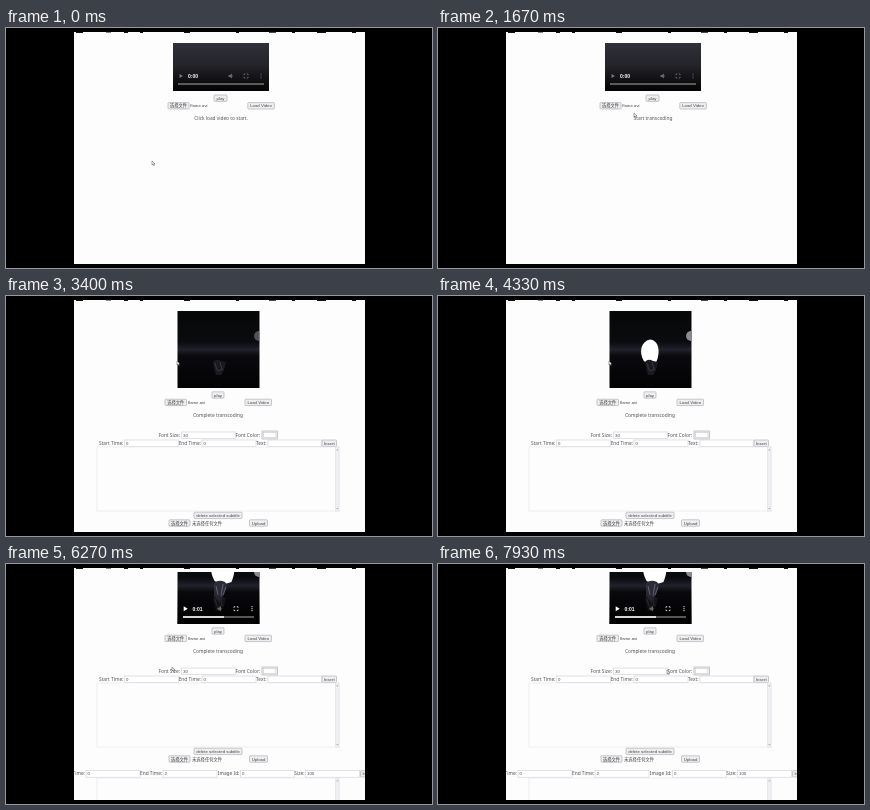
These frames come from a looping animation (426x240 px, 8000 ms). An HTML page:

```html
<!DOCTYPE html>
<html lang="en">
<head>
<meta charset="utf-8">
<style>
html, body { margin: 0; width: 100%; height: 100%; overflow: hidden; background: #000; }
svg { display: block; width: 100%; height: 100%; }
text { font: 4.3px "Liberation Sans", "Noto Sans CJK SC", "Noto Sans CJK", sans-serif; fill: #444; }
.label { font: 4.8px "Noto Sans", sans-serif; fill: #555; }
.time { font-size: 5px; font-weight: bold; fill: #fff; }
</style>
</head>
<body>
<svg viewBox="0 0 426 240">
  <defs>
    <linearGradient id="empty" x2="0" y2="1">
      <stop stop-color="#30303a"/><stop offset=".45" stop-color="#24242a"/><stop offset="1" stop-color="#030303"/>
    </linearGradient>
    <linearGradient id="night" x2="0" y2="1">
      <stop stop-color="#060807"/><stop offset=".4" stop-color="#0a0b0e"/><stop offset=".5" stop-color="#20212b"/>
      <stop offset=".58" stop-color="#0a0a0e"/><stop offset="1" stop-color="#020203"/>
    </linearGradient>
    <linearGradient id="shade" x2="0" y2="1">
      <stop stop-opacity="0"/><stop offset="1" stop-opacity=".75"/>
    </linearGradient>
    <clipPath id="page"><rect x="68" y="4" width="291" height="232"/></clipPath>
    <clipPath id="view"><rect x="68" y="8" width="291" height="228"/></clipPath>
    <clipPath id="screen"><rect x="171.5" y="15" width="82" height="77"/></clipPath>
  </defs>
  <rect width="426" height="240"/>
  <rect x="68" y="4" width="291" height="232" fill="#fdfdfe"/>
  <path d="M70 4.3h7M100 4h5M118 4.3h4M134 4.3h3M178 4.3h6M230 4.3h3M263 4.2h7M286 4.3h3M311 4.3h9M346 4.3h4" stroke="#111" stroke-width="1.2"/>
  <g id="before" clip-path="url(#page)"></g>
  <g clip-path="url(#view)"><g id="after"></g></g>
  <g id="cursor">
    <path id="arrow" d="M0 0v4.6l1.1-1 .8 1.8 .9-.4-.8-1.7h1.5z" fill="#fff" stroke="#333" stroke-width=".5"/>
    <path id="pointer" d="M1 0h1v2l2.3.5v2l-.8 1.3h-2.2l-1.5-2.2 1.2-.2z" fill="#fff" stroke="#333" stroke-width=".3"/>
  </g>
</svg>
<script>
const $ = id => document.getElementById(id);
const LOOP = 8000, STEP = 200 / 3;

const text = (x, y, s, attrs = '') => `<text x="${x}" y="${y}" ${attrs}>${s}</text>`;
const label = (x, y, s) => text(x, y, s, 'class="label"');
const box = (x, y, w, h, fill, stroke, r = 0) =>
  `<rect x="${x}" y="${y}" width="${w}" height="${h}" rx="${r}" fill="${fill}" stroke="${stroke}" stroke-width=".6"/>`;
const button = (x, y, w, s) => box(x, y, w, 6.4, '#efeff1', '#a5a5ad', .8) +
  text(x + w / 2, y + 4.7, s, 'text-anchor="middle"');
const input = (x, y, s = '') => box(x, y, 54, 6.6, '#fff', '#ceced6') + text(x + 1.5, y + 4.8, s);
const area = (y, h) => box(91, y, 242, h, '#fdfdfe', '#e4e4ea') +
  box(329.5, y, 3.5, h, '#f0f0f2', '#dedee4') +
  `<path d="M330.3 ${y + 3.2}l1-1.3 1 1.3zM330.3 ${y + h - 3}l1 1.3 1-1.3z" fill="#999"/>`;
const message = (id, x, y) => text(x, y, '', `id="${id}" class="label" text-anchor="middle"`);

// Speaker, fullscreen corners and menu dots, centred on the given x positions.
const icons = (y, speaker, full, menu, color) => `
  <path d="M${speaker - 2.5} ${y - 1}h1.5l2-1.6v5.2l-2-1.6h-1.5zM${speaker + 1.4} ${y - 1}q1.6 1 0 2" fill="#666"/>
  <path d="M${full - 2} ${y - .8}v-1.2h1.2m1.6 0h1.2v1.2m0 1.6v1.2h-1.2m-1.6 0h-1.2v-1.2" fill="none" stroke="${color}" stroke-width=".8"/>
  ${[-2, 0, 2].map(d => `<circle cx="${menu}" cy="${y + d}" r=".6" fill="${color}"/>`).join('')}`;

$('before').innerHTML =
  box(167, 15, 96, 48, 'url(#empty)', 'none') +
  '<path d="M173.5 46l3.5 2-3.5 2z" fill="#777"/>' +
  text(182, 50, '0:00', 'class="time"') +
  icons(48, 225, 240, 255, '#777') +
  '<path d="M172 56h86" stroke="#aaa"/>' +
  button(208, 67, 13, 'play') +
  button(162, 74.6, 21, '选择文件') + text(184.3, 79.3, 'flame.avi') +
  button(241.8, 74.6, 26.5, 'Load Video') +
  message('status', 215, 92);

$('after').innerHTML =
  `<g clip-path="url(#screen)">
    <rect x="171" y="15" width="83" height="77" fill="url(#night)"/>
    <circle id="lamp" cx="253" cy="40" r="5" fill="#8a8a90"/>
    <path id="flame" fill="#fff"/>
    <path d="M207 66q3-4 8-1l5 1-2 8-3 5h-5l-2-7z" fill="#191920"/>
    <path d="M209 67l2 7m3-8l2 7m-5 2l6-2" stroke="#44444e" stroke-width=".7"/>
    <g id="hand">
      <path d="M208 51q5-4 11-1l2 3-3 10-4 8-6-7z" fill="#2b2c38"/>
      <path d="M210 54l2 9m5-11l-2 12m5-9l-3 8" stroke="#777a88" stroke-width=".7"/>
    </g>
    <g id="controls">
      <rect x="171" y="58" width="83" height="34" fill="url(#shade)"/>
      <path id="toggle" fill="#fff"/>
      ${text(186.5, 78.7, '', 'id="clock" class="time"')}
      ${icons(76.7, 214, 230, 246, '#eee')}
      <path d="M177 85h71" stroke="#aaa" stroke-width="1.2"/>
      <path id="progress" stroke="#fff" stroke-width="1.5"/>
      <circle id="knob" cy="85" r="1.8" fill="#fff"/>
    </g>
  </g>` +
  button(206, 95.8, 12, 'play') +
  button(159, 103.2, 21.5, '选择文件') + text(182, 108, 'flame.avi') +
  button(239, 103.2, 26.5, 'Load Video') +
  label(187, 121, 'Complete transcoding') +
  label(152.5, 141.4, 'Font Size:') + input(175.5, 136, '30') +
  label(229.5, 141.2, 'Font Color:') + box(256, 135, 15.5, 8, '#eee', '#aaa') + box(257.6, 136.6, 12.3, 4.8, '#fff', '#ccc') +
  label(93, 149, 'Start Time:') + input(118.5, 144, '0') +
  label(172.7, 149, 'End Time:') + input(196, 144, '0') +
  label(250, 149, 'Text:') + input(262, 144) + button(316, 144, 14.5, 'Insert') +
  area(151, 64) +
  button(188, 216.2, 48, 'delete selected subtitle') +
  button(163, 223.8, 21, '选择文件') + text(186, 228.5, '未选择任何文件') +
  button(243.5, 223.8, 18, 'Upload') +
  label(54.5, 243.3, 'Start Time:') + input(80, 238.6, '0') +
  label(134, 243.3, 'End Time:') + input(157, 238.6, '2') +
  label(211.8, 243.3, 'Image Id:') + input(234.5, 238.6, '0') +
  label(288.3, 243.3, 'Size:') + input(299.5, 238.6, '100') + button(354.5, 238.6, 14.5, 'Insert') +
  area(246, 64);

// Eased interpolation through rows of [time, ...values].
function track(rows, t) {
  const i = rows.findIndex(row => row[0] > t);
  if (i === 0) return rows[0].slice(1);
  if (i < 0) return rows.at(-1).slice(1);
  const a = rows[i - 1], b = rows[i], u = (t - a[0]) / (b[0] - a[0]), k = u * u * (3 - 2 * u);
  return a.slice(1).map((v, j) => v + (b[j + 1] - v) * k);
}

const cursorPath = [[0, 146, 133], [400, 255, 78], [600, 255, 78], [930, 196, 85], [1800, 196, 85], [2400, 187, 86],
  [2700, 178, 77], [3000, 178, 77], [3300, 171, 65], [4400, 171, 65], [4800, 176, 76], [5300, 176, 76],
  [5800, 190, 100], [6270, 166, 103], [7000, 210, 105], [7600, 229, 106]];
const flamePath = [[3300, 212, 66, 68, 0], [3700, 212, 57, 68, 5], [4330, 212, 43, 68, 9], [5130, 217, 20, 52, 12]];
const scrollPath = [[5400, 0], [5900, -32]];
const START = 2800, PAUSE = 5200;

function flameShape([x, top, bottom, r]) {
  const h = bottom - top, y = top + h * .5;
  return `M${x} ${top}C${x + r} ${top + 1} ${x + r * 1.2} ${y} ${x + r * .7} ${bottom - 2}Q${x} ${bottom + 2} ${x - r * .7} ${bottom - 3}C${x - r * 1.3} ${y} ${x - r} ${top + 2} ${x} ${top}Z`;
}

const show = (id, on) => $(id).style.display = on ? '' : 'none';

function draw(t) {
  const loaded = t >= 1800, playing = t >= START && t < PAUSE;
  show('before', !loaded);
  show('after', loaded);
  $('status').textContent = t < 500 ? 'Click load video to start.' :
    t < 1200 ? 'Loading ffmpeg-core.js' : 'Start transcoding';

  const [scroll] = track(scrollPath, t);
  $('after').setAttribute('transform', `translate(0 ${scroll})`);
  $('flame').setAttribute('d', flameShape(track(flamePath, t)));
  show('flame', t >= 3300);
  show('hand', t >= 4700);
  $('lamp').setAttribute('opacity', track([[3300, .55], [4300, 1]], t)[0]);

  const played = Math.max(0, Math.min(t, PAUSE) - START) / (PAUSE - START);
  const end = 178 + 40 * played;
  show('controls', t < 3400 || t >= 4500);
  $('clock').textContent = t < 4000 ? '0:00' : '0:01';
  $('toggle').setAttribute('d', playing ? 'M177.5 74.5h1.3v4.6h-1.3zM180 74.5h1.3v4.6H180z' : 'M177.7 74.2l4 2.5-4 2.5z');
  $('progress').setAttribute('d', `M177 85H${end}`);
  $('knob').setAttribute('cx', end);
  show('knob', t < START);

  const [x, y] = track(cursorPath, t);
  const overControls = loaded && x > 174 && y > 72 && y < 90;
  show('pointer', overControls);
  show('arrow', !overControls);
  $('cursor').setAttribute('transform', `translate(${x} ${y}) scale(.85)`);
}

function tick() {
  const t = performance.now() % LOOP;
  draw(Math.floor(t / STEP + .01) * STEP);
  requestAnimationFrame(tick);
}
tick();
</script>
</body>
</html>
```
